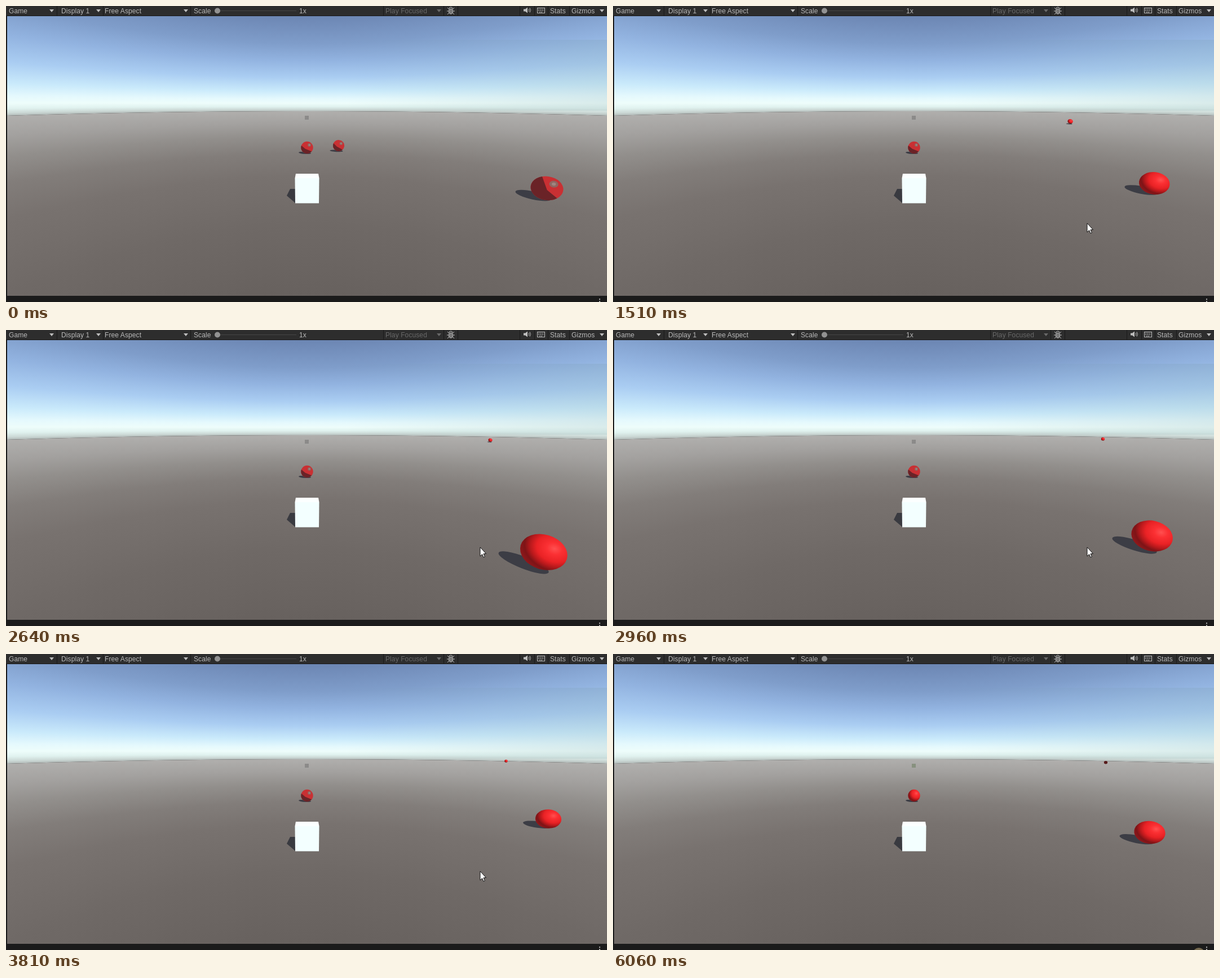
Animation, 1066 px wide and 526 px high, one loop 6.13 s. Source, as an HTML page with a canvas:

```html
<!DOCTYPE html>
<html>
<head>
<meta charset="utf-8">
<style>
html, body { margin: 0; width: 100%; height: 100%; overflow: hidden; background: #1b1b1b; }
canvas, svg { position: absolute; left: 0; top: 0; display: block; }
text { font: 12px "Liberation Sans", Arial, sans-serif; letter-spacing: .1px; fill: #b9b9b9; }
.dim { fill: #696969; }
</style>
</head>
<body>
<canvas id="view" width="1066" height="526"></canvas>
<svg width="1066" height="526">
  <rect width="1066" height="17" fill="#2d2d2d"/>
  <path d="M0 17.5H1066M90.5 0V17M172.5 0V17M327.5 0V17M669.5 0V17M776.5 0V17M801.5 0V17M911.5 0V17M937.5 0V17M961.5 0V17M999.5 0V17" stroke="#191919"/>
  <text x="5" y="13">Game</text>
  <text x="98" y="13">Display 1</text>
  <text x="175" y="13">Free Aspect</text>
  <text x="333" y="13">Scale</text>
  <text x="520" y="13">1x</text>
  <text x="673" y="13" class="dim">Play Focused</text>
  <text x="965" y="13">Stats</text>
  <text x="1003" y="13">Gizmos</text>
  <path d="M77 6h8l-4 5zM160 6h8l-4 5zM315 6h8l-4 5zM1053 6h8l-4 5z" fill="#bdbdbd"/>
  <path d="M764 6h8l-4 5z" fill="#696969"/>
  <path d="M380 8.5H515" stroke="#464646"/>
  <circle cx="375" cy="8.5" r="5" fill="#929292"/>
  <g fill="none" stroke="#bdbdbd">
    <path d="M783 3l3 3M795 3l-3 3M782 9h3M793 9h3M783 15l3-3M795 15l-3-3M786 5a3 3 0 0 1 6 0"/>
    <ellipse cx="789" cy="9.5" rx="3.5" ry="4.5" fill="#777"/>
    <path d="M927 5q2 2.500 0 5M929 3.500q3 4 0 8"/>
    <rect x="942.500" y="3.500" width="13" height="9"/>
    <path d="M944 6h10M944 8.500h10M946 11h6" stroke-dasharray="2 1"/>
  </g>
  <path d="M918 5.500h3l4-3v10l-4-3h-3z" fill="#bdbdbd"/>
  <path d="M1052 520h2v2h-2zM1052 524h2v2h-2z" fill="#b0b0b0"/>
</svg>
<script>
const LOOP = 6130, RESET = 4410;
const ctx = document.getElementById('view').getContext('2d');
const lerp = (a, b, k) => a + (b - a) * k;

function ramp(g, y0, y1, span, stops) {
  const grad = g.createLinearGradient(0, y0, 0, y1);
  for (const [u, color] of stops) grad.addColorStop(u / span, color);
  return grad;
}

const SKY = [[0, '#b2bab8'], [3, '#cbd8d5'], [8, '#e0f2ef'], [14, '#eefdfb'], [22, '#e5f9fd'],
  [36, '#caeafb'], [60, '#aacdf2'], [90, '#92b3e0'], [120, '#7f9dca'], [169, '#6c86b3']];
const GROUND = [[0, '#b0afad'], [22, '#a3a19f'], [45, '#928f8c'], [75, '#827d7a'],
  [115, '#78726f'], [200, '#6f6966'], [330, '#67615e']];

// The backdrop never changes: each column is a slice of the wide-angle view
function backdrop() {
  const c = document.createElement('canvas');
  c.width = 1066; c.height = 526;
  const g = c.getContext('2d');
  g.fillStyle = '#1b1b1b';
  g.fillRect(0, 0, 1066, 526);
  for (let x = 2; x < 1066; x++) {
    const dx = x - 533, s = 431 / Math.hypot(431, dx);
    const hor = 187 + 8 * (dx / 533) ** 2;
    g.fillStyle = ramp(g, hor, hor - 169 / s, 169, SKY);
    g.fillRect(x, 18, 1, hor - 18);
    g.fillStyle = ramp(g, hor, hor + 330 / s, 330, GROUND);
    g.fillRect(x, hor, 1, 515 - hor);
  }
  const shade = g.createLinearGradient(600, 0, 1066, 0);
  shade.addColorStop(0, 'rgba(110,145,150,0)');
  shade.addColorStop(1, 'rgba(110,145,150,.16)');
  g.fillStyle = shade;
  g.fillRect(600, 60, 466, 126);
  return c;
}
const scene = backdrop();

function poly(color, ...pts) {
  ctx.fillStyle = color;
  ctx.beginPath();
  for (let i = 0; i < pts.length; i += 2) ctx.lineTo(pts[i], pts[i + 1]);
  ctx.closePath();
  ctx.fill();
}

function oval(color, x, y, rx, ry, turn = 0) {
  ctx.fillStyle = color;
  ctx.beginPath();
  ctx.ellipse(x, y, rx, ry, turn, 0, 7);
  ctx.fill();
}

// Unit disc mapped to the ball; cut is the edge of the shaded side when flat
function ball(x, y, rx, ry, turn, cut) {
  ctx.save();
  ctx.translate(x, y);
  ctx.rotate(turn);
  ctx.scale(rx, ry);
  if (cut) {
    oval('#c93033', 0, 0, 1, 1);
    ctx.clip();
    poly('#6a2327', ...cut, 1, 1.2, -1.2, 1.2, -1.2, -1);
    oval('#8f6661', .38, -.42, .28, .28);
    oval('#a08580', .38, -.42, .13, .13);
  } else {
    const g = ctx.createRadialGradient(.38, -.36, 0, .38, -.36, 1.5);
    [[0, '#ff5050'], [.22, '#fb3033'], [.5, '#e92225'], [.68, '#b8191c'], [.84, '#7d1417'], [1, '#8e181b']]
      .forEach(s => g.addColorStop(...s));
    oval(g, 0, 0, 1, 1);
  }
  ctx.restore();
}

const CUT_BIG = [-.45, -1.1, .02, .15, .9, .9];
const CUT_SMALL = [-1.1, -.45, -.3, .2, .9, .7];
const SHADOW = '#3c3d45';

// Bounces along the depth axis: z follows parabolas, screen height is 1 / z
function nearBall(t) {
  let x, y;
  if (t >= RESET) {
    x = 952; y = 317;
  } else {
    const z = t < 1396 ? .0072
      : t < 2767 ? .00829 - .55e-8 * (t - 1841) ** 2
      : .00926 - .55e-8 * (t - 3785) ** 2;
    y = 185 + 1 / z;
    x = 962 - .08 * (y - 293);
  }
  const w = 46 + .385 * (y - 293), turn = Math.atan2(y - 267, x - 533);
  oval(SHADOW, x - .42 * w, y + .22 * w, .56 * w, .125 * w, turn + .08);
  ball(x, y, .503 * w, .365 * w, turn, t < 1396 && CUT_BIG);
}

// Time and screen x; the ball rolls away to the horizon and back
const ROLL = [[0, 590], [70, 592], [680, 737], [1300, 799], [1510, 811], [1930, 834], [2640, 859], [2960, 869],
  [3250, 876], [3810, 887], [4720, 897], [4850, 898], [5140, 893], [5780, 880], [6060, 874], [6130, 872.5]];

function farBall(t) {
  const i = ROLL.findIndex(k => k[0] > t);
  const [t0, x0] = ROLL[i - 1], [t1, x1] = ROLL[i];
  const x = 925 - 1 / lerp(1 / (925 - x0), 1 / (925 - x1), (t - t0) / (t1 - t0));
  const y = 185 + (914 - x) * .1946, r = 2.6 + (897 - x) * .0246;
  if (r > 3.5) oval(SHADOW, x - .4 * r, y + .92 * r, 1.15 * r, .18 * r, .05);
  if (t >= RESET) {
    oval(t < 5400 ? '#35191a' : '#571b1b', x, y, r, r * .85);
    return;
  }
  ball(x, y, r, r * (r > 6 ? .98 : .87), .1, t < 70 && CUT_SMALL);
}

function cursor(t) {
  if (t < 400 || t > 4860) return;
  const k = t < 650 ? 1 - (t - 400) / 250 : 0, out = Math.max(0, (t - 4790) / 70);
  ctx.save();
  ctx.translate(841 + 119 * k + 67 * out, 386 + 96 * k + 91 * out);
  poly('#fff', 0, 0, 0, 16, 3.6, 12.6, 6, 18, 8.3, 17, 6, 11.7, 10.5, 11.5);
  ctx.strokeStyle = '#111';
  ctx.stroke();
  ctx.restore();
}

function draw(now) {
  const t = now % LOOP, after = t >= RESET;
  ctx.drawImage(scene, 0, 0);
  ctx.fillStyle = after ? '#87917f' : '#8b8a89';
  ctx.fillRect(530, 195, 7, 7);

  oval(SHADOW, 530, 261, 11, 2, .06);
  ball(534, 251.5, 10.7, 10.7, 0, !after && CUT_SMALL);
  farBall(t);

  poly('#393a40', 513, 325, 504, 325, 498, 337, 513, 350);
  poly('#fcffff', 514, 298, 554, 298, 555.5, 306, 512.5, 306);
  poly('#f3ffff', 512.5, 306, 555.5, 306, 555, 350.5, 513, 350.5);

  nearBall(t);
  cursor(t);
  if (t >= 6030) oval('#776b50', 1039, 531, 10, 9);
  requestAnimationFrame(draw);
}
requestAnimationFrame(draw);
</script>
</body>
</html>
```
